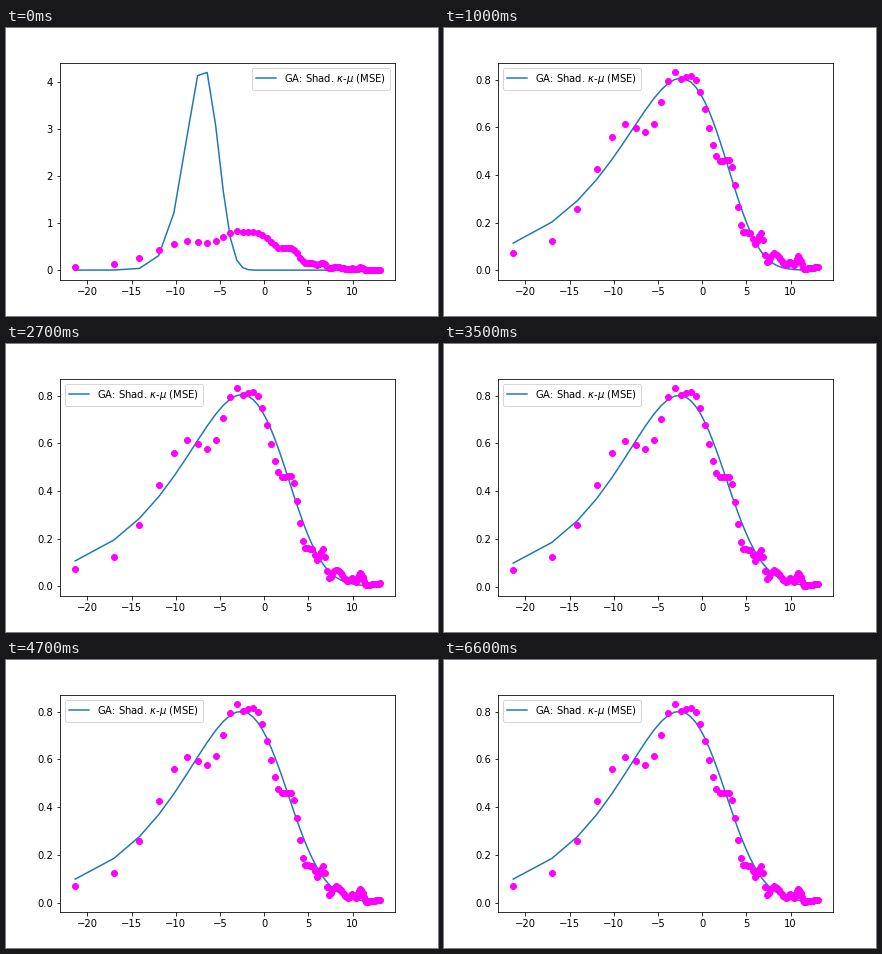
Animation of 432x288 px, one loop 8.3 s. Source, as a matplotlib script:

```python
import numpy as np
import matplotlib.pyplot as plt
from matplotlib.animation import FuncAnimation

FRAMES, STEP_MS, LAST_STEP = 83, 100, 66
SETTLE_FROM, SETTLE_TO = 19, 35

# Fit parameters: scale, power, decay, tail weight
START = np.array([1.0255e7, 11.3, 27.9, 0])
EARLY = np.array([2.03, 1.168, 1.07, .042])
LATE = np.array([2.30, 1.27, 1.30, .107])

# Turning points of the measured density: bin, value
TURNS = np.array([
    (0, .072), (5, .612), (7, .578), (11, .83), (12, .803), (14, .816),
    (21, .46), (24, .461), (29, .16), (32, .155), (34, .11), (37, .155),
    (40, .035), (44, .07), (52, .022), (55, .036), (58, .02), (61, .058),
    (66, .006), (79, .012)])


def through_turns(x):
    """Join the turning points with half cosine waves."""
    spots, values = TURNS.T
    place = np.interp(x, spots, np.arange(len(spots)))
    left = np.floor(place)
    ease = (1 - np.cos(np.pi * (place - left))) / 2
    return np.interp(left + ease, np.arange(len(spots)), values)


bins = np.arange(80)
density = through_turns(bins)

# Evenly spaced amplitudes on a dB axis
level = -21.38 + 20 * np.log10(1 + bins / 1.53)
amp = 10 ** (level / 20)


def fit_at(step):
    if step == 0:
        return START
    t = np.clip((step - SETTLE_FROM) / (SETTLE_TO - SETTLE_FROM), 0, 1)
    return EARLY + (LATE - EARLY) * t * t * (3 - 2 * t)


def curve(scale, power, decay, tail):
    sq = amp ** 2
    return scale * amp ** power * np.exp(-decay * sq / (1 + tail * sq))


plt.rcParams["figure.dpi"] = 72
fig, ax = plt.subplots(figsize=(6, 4))
fig.subplots_adjust(bottom=0.125)


def draw(i):
    step = min(i, LAST_STEP)
    ax.clear()
    ax.plot(level, curve(*fit_at(step)), color="C0",
            label=r"GA: Shad. $\kappa$-$\mu$ (MSE)")
    ax.plot(level, density, "o", color="magenta")
    ax.legend(loc="upper left" if step else "upper right")
    return []


anim = FuncAnimation(fig, draw, frames=FRAMES, interval=STEP_MS,
                     repeat=True, repeat_delay=0)
plt.show()
```
